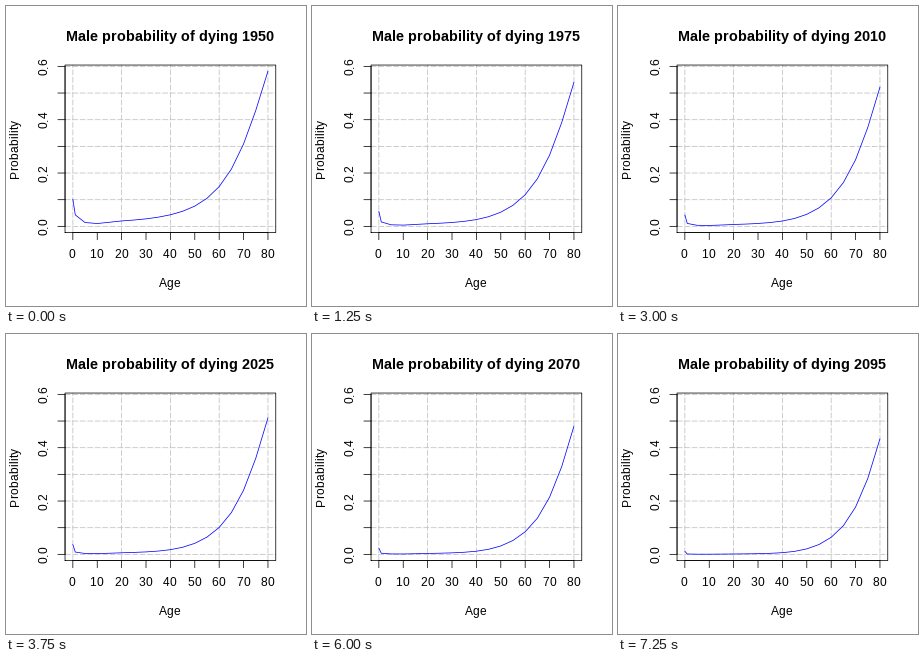
These frames come from a looping animation (300x300 px, 7.5 s). A matplotlib script:

```python
import numpy as np
import matplotlib.pyplot as plt
from matplotlib.animation import FuncAnimation

# At 72 dpi one point is one pixel.
SIZE, DPI = 300, 72
FRAMES, INTERVAL = 30, 250
FIRST_YEAR, STEP = 1950, 5
LEFT, RIGHT, TOP, BOTTOM = 59.04, 269.76, 59.04, 226.56
TICK = 7.2
LINE = 0.75
Y_MAX = 0.5817

plt.rcParams.update({
    "font.family": "Liberation Sans",
    "text.hinting": "force_autohint",
    "text.hinting_factor": 8,
    "path.simplify": False,
})

AGES = np.array([0, 1, *range(5, 81, 5)])


def px(age):
    pad = (RIGHT - LEFT) * 0.04 / 1.08
    return LEFT + pad + age / 80 * (RIGHT - LEFT) / 1.08


def py(prob):
    pad = (BOTTOM - TOP) * 0.04 / 1.08
    return BOTTOM - pad - prob / Y_MAX * (BOTTOM - TOP) / 1.08


def progress(u):
    """Share of the total decline reached: fast, then steady, then fast."""
    return (u + 0.114 * np.sin(2 * np.pi * u) + 0.034 * np.sin(4 * np.pi * u)
            - 0.04 * np.sin(np.pi * u))


def dying(age, u):
    """Log-odds by age at the start, less an age-dependent decline."""
    s = (80 - age) / 5
    ageing = 0.331 - 0.6208 * s + 0.02718 * s**2 - 0.000385 * s**3
    infancy = 2.05 * np.exp(-0.6 * age)
    childhood = -0.45 * np.exp(-((age - 10) / 5) ** 2)
    decline = (0.59 + 0.05 * s + 1.45 / (1 + np.exp((age - 45) / 7))
               + 0.8 * np.exp(-age / 8) - 1.35 * np.exp(-3 * age))
    logit = ageing + infancy + childhood - progress(u) * decline
    return 1 / (1 + np.exp(-logit))


fig = plt.figure(figsize=(SIZE / DPI, SIZE / DPI), dpi=DPI, facecolor="white")
ax = fig.add_axes([0, 0, 1, 1])
ax.set_xlim(0, SIZE)
ax.set_ylim(SIZE, 0)
ax.axis("off")


def stroke(xs, ys, color="black", **style):
    line, = ax.plot(xs, ys, color=color, lw=LINE, snap=False,
                    solid_capstyle="round", solid_joinstyle="round", **style)
    return line


def label(x, y, text, size=12, weight="normal", upright=False):
    """Centred text whose letters advance by whole pixels."""
    glyphs = [ax.text(0, 0, c, size=size, weight=weight, ha="left",
                      va="baseline", rotation_mode="anchor") for c in text]
    widths = [round(g.get_window_extent().width) for g in glyphs]
    half = sum(widths) / 2
    pen = round(y + half) if upright else round(x - half)
    for glyph, width in zip(glyphs, widths):
        # The small shift makes the renderer round side bearings down.
        if upright:
            glyph.set(position=(x - 0.49, pen), rotation=90)
            pen -= width
        else:
            glyph.set_position((pen - 0.49, y))
            pen += width
    return glyphs


dashes = dict(color="#bebebe", linestyle=(0, (7, 3)), dash_capstyle="round")
for age in range(0, 81, 20):
    stroke([px(age)] * 2, [BOTTOM, TOP], **dashes)
for tenth in range(7):
    stroke([LEFT, RIGHT], [py(tenth / 10)] * 2, **dashes)

curve = stroke([], [], color="blue")

# Axes, ticks and box
stroke([px(0), px(80)], [BOTTOM] * 2)
for age in range(0, 81, 10):
    stroke([px(age)] * 2, [BOTTOM, BOTTOM + TICK])
    label(px(age), 252, str(age))

stroke([LEFT] * 2, [py(0), py(0.6)])
for tenth in range(7):
    y = py(tenth / 10)
    stroke([LEFT, LEFT - TICK], [y, y])
    if tenth % 2 == 0:
        label(42, y, f"{tenth / 10:.1f}", upright=True)

stroke([LEFT, RIGHT, RIGHT, LEFT, LEFT], [BOTTOM, BOTTOM, TOP, TOP, BOTTOM])

mid_x, mid_y = (LEFT + RIGHT) / 2, (TOP + BOTTOM) / 2
label(mid_x, 281, "Age")
label(13, mid_y, "Probability", upright=True)
title = label(mid_x, 35, f"Male probability of dying {FIRST_YEAR}",
              size=14.4, weight="bold")
year_digits = title[-4:]


def draw(i):
    for glyph, digit in zip(year_digits, str(FIRST_YEAR + STEP * i)):
        glyph.set_text(digit)
    curve.set_data(px(AGES), py(dying(AGES, i / (FRAMES - 1))))
    return [curve, *year_digits]


anim = FuncAnimation(fig, draw, frames=FRAMES, interval=INTERVAL,
                     repeat=True, repeat_delay=0)
plt.show()
```
